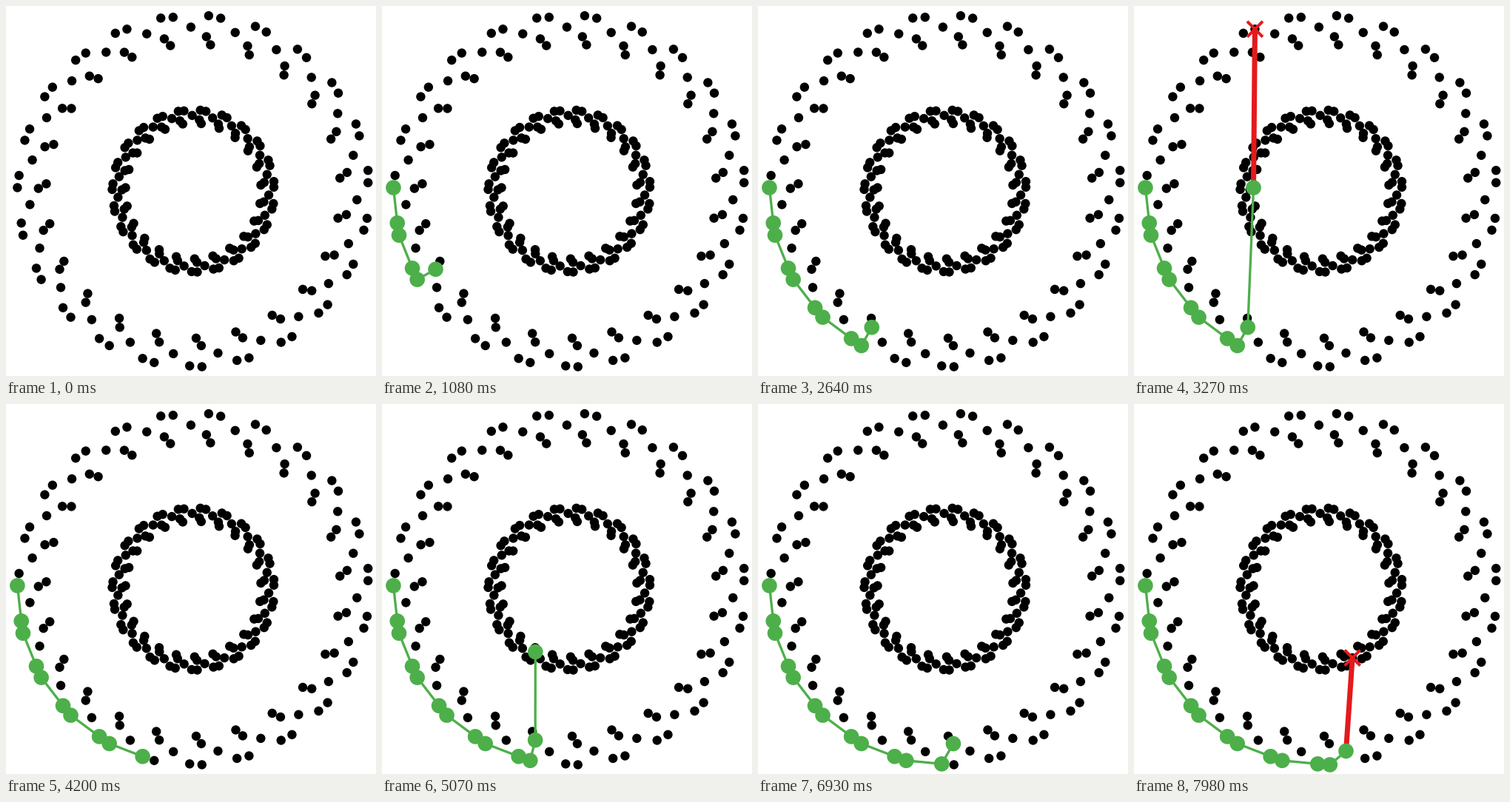
These frames come from a looping animation (500 by 500 pixels, 8 s). A matplotlib script:

```python
import numpy as np
import matplotlib.pyplot as plt
from matplotlib.animation import FuncAnimation
from matplotlib.collections import PatchCollection
from matplotlib.patches import Circle

SIZE, DPI = 500, 100
PX = 72 / DPI
GREEN, RED = "#4daf4a", "#e41a1c"
CENTER = np.array([253.1, 250.0])
SECTORS = 23
# (radius, angle in degrees) of the five points in each sector
MOTIF = [(236.4, 185.1), (237.75, 181.1), (209.3, 180.95),
         (198.9, 182.8), (221.5, 190.9)]
RINGS = (1.0, 0.461)
STEPS = 267
TICK = 20


def make_points():
    pts = []
    for scale in RINGS:
        for n in range(SECTORS):
            for r, deg in MOTIF:
                a = np.radians(deg - 360 * n / SECTORS)
                pts.append(CENTER + scale * r * np.array([np.cos(a), np.sin(a)]))
    return sorted(map(tuple, pts))


def cross(a, b, c):
    return (b[0] - a[0]) * (c[1] - b[1]) - (b[1] - a[1]) * (c[0] - b[0])


def scan(pts):
    """Half of a monotone-chain hull; yields (chain, rejected point)."""
    chain = []
    yield [], None
    for p in pts:
        while len(chain) > 1 and cross(chain[-2], chain[-1], p) >= 0:
            bad = chain.pop()
            yield chain[:], bad
        chain.append(p)
        yield chain[:], None


def discs(pts, radius):
    return [Circle(p, radius) for p in pts]


points = make_points()
states = list(scan(points))[:STEPS]

fig = plt.figure(figsize=(SIZE / DPI, SIZE / DPI), dpi=DPI, facecolor="white")
ax = fig.add_axes([0, 0, 1, 1])
ax.set_xlim(0, SIZE)
ax.set_ylim(SIZE, 0)
ax.axis("off")

ax.add_collection(PatchCollection(discs(points, 6.2), facecolor="black",
                                  linewidth=0, zorder=1))
edge, = ax.plot([], [], color=GREEN, lw=3.3 * PX, zorder=2)
reject, = ax.plot([], [], color=RED, lw=7 * PX, solid_capstyle="butt", zorder=3)
mark, = ax.plot([], [], color=RED, lw=4 * PX, solid_capstyle="butt", zorder=3)
knots = PatchCollection([], facecolor=GREEN, linewidth=0, zorder=4)
ax.add_collection(knots)


def draw_mark(p, h=10.5):
    x, y = p
    mark.set_data([x - h, x + h, np.nan, x - h, x + h],
                  [y - h, y + h, np.nan, y + h, y - h])


def update(i):
    # the scan advances every 30 ms
    chain, bad = states[min((2 * i + 1) // 3, STEPS - 1)]
    edge.set_data([p[0] for p in chain], [p[1] for p in chain])
    knots.set_paths(discs(chain, 10.3))
    if bad is None:
        reject.set_data([], [])
        mark.set_data([], [])
    else:
        reject.set_data([chain[-1][0], bad[0]], [chain[-1][1], bad[1]])
        draw_mark(bad)
    return edge, reject, mark, knots


anim = FuncAnimation(fig, update, frames=400, interval=TICK,
                     init_func=lambda: update(0), repeat=True,
                     repeat_delay=0, blit=False)
plt.show()
```
